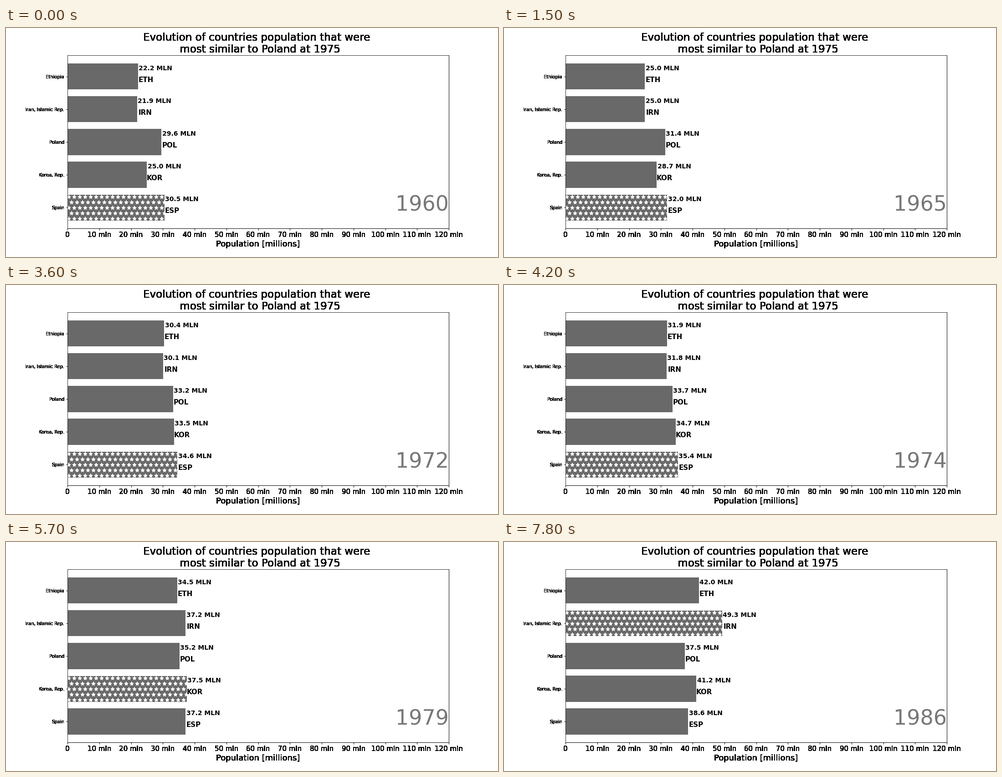
A matplotlib script for the animation above (8 s loop, 1080 by 504 pixels).

```python
import numpy as np
import matplotlib.pyplot as plt
from matplotlib.animation import FuncAnimation

STEP = 3  # ticks of 100 ms per year
YEARS = np.arange(1960, 1987)
KEY_YEARS = [1960, 1965, 1969, 1974, 1979, 1983, 1986]

# Population in millions at the key years, bottom bar first
COUNTRIES = [
    ("Spain", "ESP", [30.46, 31.96, 33.44, 35.37, 37.19, 38.17, 38.59]),
    ("Korea, Rep.", "KOR", [25.01, 28.71, 31.54, 34.69, 37.53, 39.91, 41.21]),
    ("Poland", "POL", [29.64, 31.44, 32.54, 33.68, 35.24, 36.57, 37.46]),
    ("Iran, Islamic Rep.", "IRN",
     [21.91, 24.96, 27.76, 31.79, 37.21, 43.60, 49.30]),
    ("Ethiopia", "ETH", [22.16, 25.01, 27.66, 31.86, 34.49, 38.14, 41.97]),
]


def yearly(keys):
    """Smooth curve through the key values, one rounded value per year."""
    curve = np.polynomial.Polynomial.fit(KEY_YEARS, keys, len(keys) - 1)
    return np.round(curve(YEARS), 1)


def harden(image, dpi):
    """Make the soft edges of black text nearly solid."""
    out = np.zeros_like(image)
    out[..., 3] = 1 - (1 - image[..., 3]) ** 30
    return out, 0, 0


ROWS = np.array([yearly(keys) for _, _, keys in COUNTRIES])

fig = plt.figure(figsize=(15, 7), dpi=72, facecolor="white")
ax = fig.add_axes([0.125, 0.125, 0.775, 0.755])
bars = ax.barh(range(5), ROWS[:, 0], height=0.8, color="dimgray")
ax.set_xlim(0, 120)
ax.set_ylim(-0.64, 4.64)
ax.set_xticks(range(0, 121, 10),
              ["0"] + [f"{v} mln" for v in range(10, 121, 10)], fontsize=15)
ax.set_yticks(range(5), [name for name, _, _ in COUNTRIES], fontsize=10)
ax.set_xlabel("Population [millions]", fontsize=18)
ax.set_title("Evolution of countries population that were \n"
             " most similar to Poland at 1975", fontsize=23)

ax.tick_params(width=1)
for side in ("bottom", "right"):
    ax.spines[side].set_linewidth(1)
for text in [ax.title, ax.xaxis.label,
             *ax.get_xticklabels(), *ax.get_yticklabels()]:
    text.set_agg_filter(harden)


def bar_label(y, text, size):
    return ax.text(0, y, text, size=size, weight="bold", ha="center")


amounts = [bar_label(i + 0.187, "", 14) for i in range(5)]
codes = [bar_label(i - 0.17, c[1], 15) for i, c in enumerate(COUNTRIES)]
year_text = ax.text(1, 0.1, "", transform=ax.transAxes, size=46,
                    color="#777777", ha="right")


def update(tick):
    year = tick // STEP
    values = ROWS[:, year]
    for bar, amount, code, v in zip(bars, amounts, codes, values):
        lead = v == values.max()
        bar.set_width(v)
        bar.set_hatch("*" if lead else "")
        bar.set_edgecolor("white" if lead else "none")
        bar.set_linewidth(1 if lead else 0)
        amount.set_text(f"{v:.1f} MLN")
        amount.set_x(v + 5.5)
        code.set_x(v + 2.5)
    year_text.set_text(str(YEARS[year]))
    return [*bars, *amounts, *codes, year_text]


anim = FuncAnimation(fig, update, frames=80, interval=100, repeat=True,
                     repeat_delay=0, blit=False)
plt.show()
```
